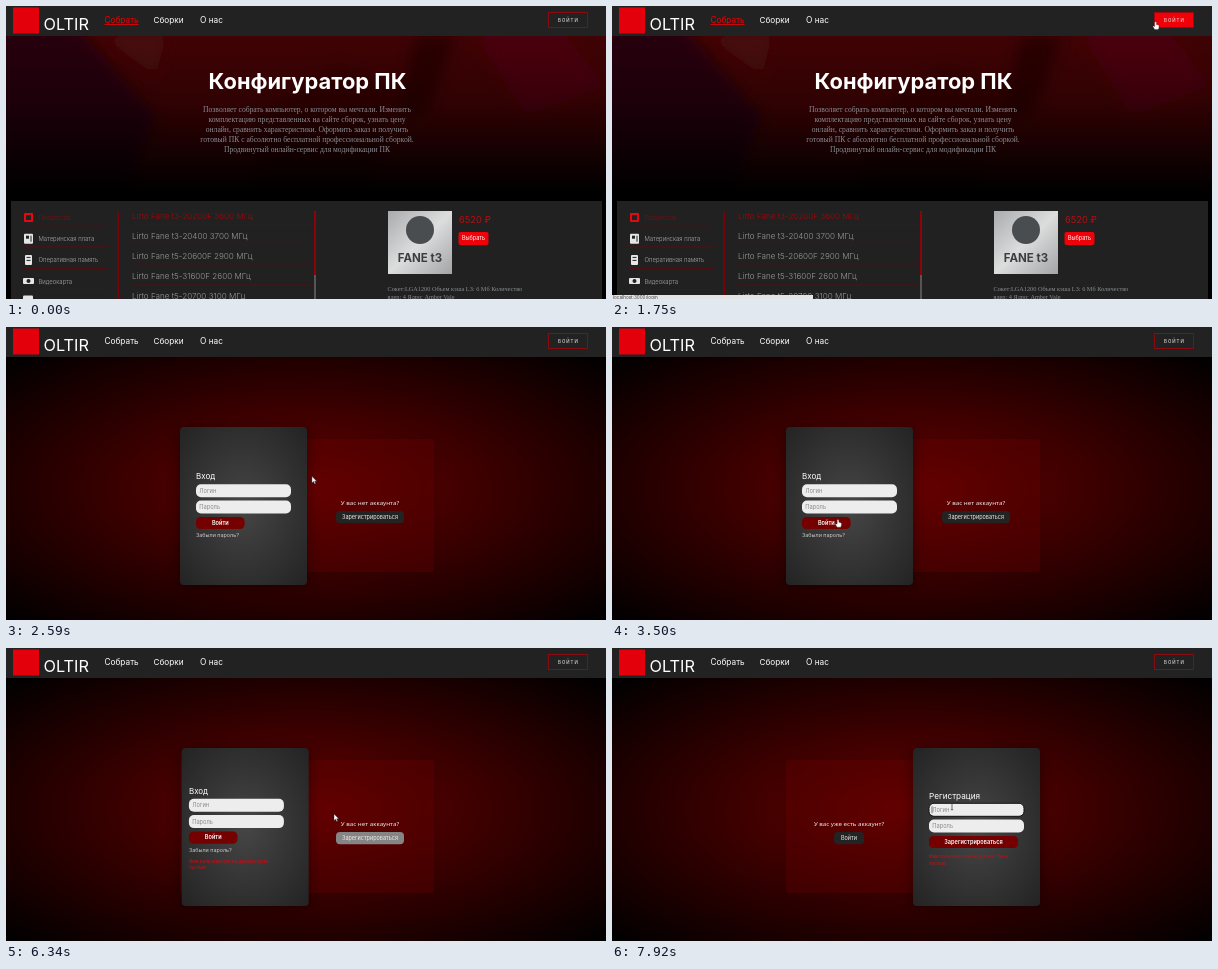
Recreate the animation shown at these times as an HTML page. Size 600 by 293 pixels, loop 8000 ms.

```html
<!DOCTYPE html>
<html lang="ru">
<head>
<meta charset="utf-8">
<title>Конфигуратор ПК</title>
<style>
html, body { margin: 0; width: 100%; height: 100%; overflow: hidden; background: #000; }
svg { display: block; }
text { font-family: Inter, sans-serif; fill: #fff; white-space: pre; }
.serif { font-family: "Liberation Serif", serif; }
.noto { font-family: "Noto Sans", sans-serif; }
.mid { text-anchor: middle; }
.shadow { filter: drop-shadow(0 2px 7px rgba(0, 0, 0, .4)); }
</style>
</head>
<body>
<svg id="stage" width="600" height="293" viewBox="0 0 600 293">
  <defs>
    <linearGradient id="fade" x2="0" y2="1">
      <stop offset="0" stop-color="#000" stop-opacity="0"/>
      <stop offset=".4" stop-color="#000" stop-opacity=".25"/>
      <stop offset=".95" stop-color="#000"/>
    </linearGradient>
    <linearGradient id="chip" x2="1" y2="1">
      <stop stop-color="#a9abad"/><stop offset=".5" stop-color="#dcdddd"/><stop offset="1" stop-color="#a2a4a6"/>
    </linearGradient>
    <radialGradient id="glow" r=".707"><stop stop-color="#680000"/><stop offset="1"/></radialGradient>
    <radialGradient id="steel" r=".707"><stop stop-color="#464646"/><stop offset="1" stop-color="#232323"/></radialGradient>
    <filter id="soft"><feGaussianBlur stdDeviation="7"/></filter>
    <clipPath id="hero"><rect y="30" width="600" height="165"/></clipPath>
    <clipPath id="list"><rect x="120" y="207.5" width="187" height="86"/></clipPath>
  </defs>
  <g id="home"></g>
  <g id="login"></g>
  <g id="header"></g>
  <g id="status">
    <rect y="289" width="201" height="4" fill="#e4e4e4"/>
    <text x="1" y="293.3" font-size="4.6" style="fill:#444">localhost:3000/login</text>
  </g>
  <g id="cursor">
    <path id="arrow" d="M0 0V6.6L1.6 5.2 2.7 7.6 3.8 7.1 2.7 4.8H4.8Z" fill="#fff" stroke="#222" stroke-width=".4"/>
    <path id="hand" transform="scale(.85)" d="M-1 .6Q0-.6 1 .6V3.2L4 4V6.5Q4 8 3 9H-1L-3.2 5.5Q-3 4.3-1 5.5Z" fill="#fff" stroke="#333" stroke-width=".4"/>
    <path id="beam" d="M-1.2-3.2H1.2M0-3.2V3.2M-1.2 3.2H1.2" stroke="#333" stroke-width=".7" fill="none"/>
  </g>
</svg>
<script>
const $ = id => document.getElementById(id);
const rect = (x, y, w, h, fill, r = 0, extra = "") =>
  `<rect x="${x}" y="${y}" width="${w}" height="${h}" rx="${r}" fill="${fill}" ${extra}/>`;
const text = (x, y, size, str, fill = "#fff", { weight = 400, cls = "", extra = "" } = {}) =>
  `<text x="${x}" y="${y}" font-size="${size}" font-weight="${weight}" class="${cls}" style="fill:${fill}" ${extra}>${str}</text>`;
const line = (x1, x2, y) => rect(x1, y, x2 - x1, .8, "#6d0408");
const centred = { cls: "mid" };
const MUTED = "#8a8d93";

// Start page
function heroHtml() {
  const shapes = [
    ["-20,20 70,20 150,110 120,190 -20,190", "#26060a"],
    ["95,30 160,30 150,70", "#4a080a"],
    ["250,110 330,60 400,80 360,190 250,190", "#360204"],
    ["410,30 450,30 420,110 390,110", "#2c0406"],
    ["470,30 560,30 600,80 520,110", "#4c0608"],
  ].map(([points, fill]) => `<polygon points="${points}" fill="${fill}"/>`).join("");
  const about = [
    "Позволяет собрать компьютер, о котором вы мечтали. Изменить",
    "комплектацию представленных на сайте сборок, узнать цену",
    "онлайн, сравнить характеристики. Оформить заказ и получить",
    "готовый ПК с абсолютно бесплатной профессиональной сборкой.",
    "Продвинутый онлайн-сервис для модификации ПК",
  ].map((s, i) => text(301, 105.5 + i * 10.15, 7.62, s, MUTED, { cls: "serif mid" })).join("");
  return `<g clip-path="url(#hero)">${rect(0, 30, 600, 165, "#400204")}<g filter="url(#soft)">${shapes}</g>
    ${rect(0, 30, 600, 165, "url(#fade)")}</g>
    ${text(301.5, 83.3, 21.9, "Конфигуратор ПК", "#fff", { weight: 700, cls: "mid" })}${about}`;
}

function shopHtml() {
  const parts = ["Процессор", "Материнская плата", "Оперативная память", "Видеокарта"];
  const menu = parts.map((name, i) => {
    const y = 211.5 + i * 21.2, color = i ? "#e6e6e6" : "#e00a10";
    const icon = [
      rect(18, y - 4.5, 9, 9, color, 1) + rect(20, y - 2.5, 5, 5, "#222"),
      rect(18, y - 5, 9, 10, color, 1) + rect(20, y - 3, 3, 3, "#222") + rect(24.5, y - 3, 1, 6, "#222"),
      rect(19, y - 5, 7, 10, color, 1) + rect(20.5, y - 3, 4, 1, "#222") + rect(20.5, y, 4, 1, "#222"),
      rect(17, y - 3, 11, 6, color, 1) + `<circle cx="22.5" cy="${y}" r="2" fill="#222"/>`,
    ][i];
    return icon + text(32.5, y + 2.4, 5.95, name, i ? "#aaa" : "#8c080c", { weight: 300 }) + line(17, 102, y + 7.9);
  }).join("") + rect(17, 289.5, 10, 4, "#e6e6e6", 1);
  const items = ["3-20200F 3600", "3-20400 3700", "5-20600F 2900", "5-31600F 2600", "5-20700 3100"];
  const list = items.map((s, i) =>
    text(126, 213.2 + i * 19.9, 8.1, `Lirto Fane t${s} МГц`, i ? "#999" : "#a3070c", { weight: 300 })
    + line(126, 307, 219 + i * 19.9)).join("");
  return rect(5, 195, 591, 98, "#212121") + menu
    + rect(111.5, 205, 1.4, 88, "#7c0408") + `<g clip-path="url(#list)">${list}</g>`
    + rect(308, 205, 2, 88, "#555") + rect(308, 205, 2, 64, "#8c0408")
    + rect(382, 205, 64, 63, "url(#chip)") + `<circle cx="414" cy="224" r="14" fill="#4a4d50"/>`
    + text(414, 255.5, 11.5, "FANE t3", "#3b3d40", { weight: 700, cls: "mid" })
    + text(453, 217, 9.5, "6520 ₽", "#d80a10", { weight: 300 })
    + rect(452.5, 226, 30, 13, "#f00008", 2) + text(467.5, 234.4, 5.5, "Выбрать", "#fff", centred)
    + text(381.5, 284.8, 6.27, "Сокет:LGA1200 Объем кэша L3: 6 Мб Количество", MUTED, { cls: "serif" })
    + text(381.5, 292.5, 6.27, "ядер: 4 Ядро: Amber Vale", MUTED, { cls: "serif" });
}

// Sign-in page; form coordinates are relative to the sliding panel
const field = (y, label, id = "") =>
  rect(16, y, 95, 13, "#ededed", 5, id && `id="${id}"`) + text(19.3, y + 8.5, 5.7, label, "#8a8a8a");
const submit = (y, w, label) =>
  rect(16, y, w, 12.2, "#740000", 4.5) + text(16 + w / 2, y + 8, 5.6, label, "#fff", { weight: 600, cls: "mid" });
const error = y => text(16, y, 4.6, "Имя пользователя не должно быть", "#e8000c")
  + text(16, y + 6.6, 4.6, "пустым", "#e8000c");
const aside = (x, w, question, label, id) =>
  text(x, 178.3, 6.15, question, "#eee", { weight: 500, cls: "noto mid" })
  + rect(x - w / 2, 184, w, 12.3, "#232323", 4, `id="${id}"`) + text(x, 192.2, 5.5, label, "#eee", centred);

function loginHtml() {
  return rect(0, 30, 600, 263, "url(#glow)")
    + rect(174, 112, 254, 133, "rgba(125,0,0,.25)", 3, 'class="shadow"')
    + aside(237, 30, "У вас уже есть аккаунт?", "Войти", "toSignIn")
    + aside(364, 68, "У вас нет аккаунта?", "Зарегистрироваться", "toSignUp")
    + `<g id="panel">${rect(0, 0, 127, 158, "url(#steel)", 4, 'class="shadow"')}
      <svg width="127" height="158">
        <g id="signIn">${text(16, 52.4, 8, "Вход")}${field(57.2, "Логин")}${field(73.5, "Пароль")}
          ${submit(89.9, 48.6, "Войти")}${text(16, 110, 5.4, "Забыли пароль?", "#ccc")}
          <g id="signInError">${error(114.9 + 6.1)}</g></g>
        <g id="signUp">${text(16, 50.8, 8.2, "Регистрация")}${field(55.3, "Логин", "focusField")}${field(71.5, "Пароль")}
          ${submit(87.9, 89, "Зарегистрироваться")}${error(110.4)}
          ${rect(18.7, 58.3, .6, 7, "#222", 0, 'id="caret"')}</g>
      </svg></g>`;
}

function headerHtml() {
  return rect(0, 0, 600, 30, "#222") + rect(7, 1.5, 26, 26, "#e3000b")
    + text(37.5, 24, 16.3, "OLTIR")
    + text(98.5, 16.6, 8.25, "Собрать", "#fff", { extra: 'id="build"' }) + rect(98.5, 18, 34, .8, "#f00008", 0, 'id="underline"')
    + text(147.5, 16.6, 8.2, "Сборки") + text(194, 16.6, 8.3, "О нас")
    + rect(542.5, 6.5, 39, 15, "#f00008", 0, 'id="enterFill"')
    + rect(542.5, 6.5, 39, 15, "none", 0, 'stroke="#a3060c" stroke-width=".8"')
    + text(562.4, 15.8, 4.4, "ВОЙТИ", "#ddd", { weight: 500, cls: "mid", extra: 'letter-spacing="1"' });
}

$("home").innerHTML = heroHtml() + shopHtml();
$("login").innerHTML = loginHtml();
$("header").innerHTML = headerHtml();

// CSS-style cubic-bezier timing
const clamp = v => Math.min(1, Math.max(0, v));
function bezier(x1, y1, x2, y2) {
  const at = (a, b, s) => 3 * a * s * (1 - s) ** 2 + 3 * b * s * s * (1 - s) + s ** 3;
  return x => {
    let lo = 0, hi = 1;
    if (x <= 0 || x >= 1) return clamp(x);
    for (let i = 0; i < 20; i++) {
      const mid = (lo + hi) / 2;
      if (at(x1, x2, mid) < x) lo = mid; else hi = mid;
    }
    return at(y1, y2, lo);
  };
}
const ease = bezier(.25, .1, .25, 1), easeInOut = bezier(.42, 0, .58, 1);

const LOOP = 8000, NAVIGATE = 1800, FAIL = 4000, SWITCH = 6300, FOCUS = 7500, SLIDE = 127;
const path = [
  [90, 583, 300], [750, 558, 36], [1000, 555, 32], [1090, 552, 27], [1250, 548, 21], [1340, 544, 15.5],
  [1740, 544, 15.5], [1840, 526, 27], [2090, 490, 50], [2900, 226, 192.5], [4800, 226, 192.5],
  [5340, 342, 211], [5720, 342, 211], [5840, 345, 189], [6270, 345, 189], [6340, 328, 166],
  [7340, 328, 166], [7480, 340, 158.5],
];
function pointer(t) {
  const i = path.findIndex(p => p[0] > t);
  if (i < 1) return (i ? path.at(-1) : path[0]).slice(1);
  const [t0, x0, y0] = path[i - 1], [t1, x1, y1] = path[i];
  const k = easeInOut((t - t0) / (t1 - t0));
  return [x0 + (x1 - x0) * k, y0 + (y1 - y0) * k];
}

const show = (id, on) => { $(id).style.display = on ? "" : "none"; };
const move = (id, x, y) => $(id).setAttribute("transform", `translate(${x} ${y})`);
const between = (t, a, b) => t >= a && t < b;

function draw(t) {
  show("home", t < NAVIGATE);
  show("login", t >= NAVIGATE);
  show("underline", t < NAVIGATE);
  show("status", between(t, 1450, 2200));
  const white = 255 * ease((t - NAVIGATE) / 400);
  $("build").style.fill = `rgb(${240 + white / 17},${white},${white})`;
  $("enterFill").setAttribute("opacity", ease((t - 1255) / 350) * (1 - ease((t - 1835) / 350)));

  const failed = t >= FAIL;
  show("signInError", failed);
  move("panel", 174 + SLIDE * easeInOut((t - SWITCH) / 500), 100);
  move("signIn", -SLIDE * ease((t - SWITCH) / 500), failed ? -6.4 : 0);
  move("signUp", SLIDE * (1 - ease((t - SWITCH - 250) / 500)), 0);
  $("toSignUp").setAttribute("fill", between(t, 5800, SWITCH + 400) ? "#858585" : "#232323");
  $("focusField").setAttribute("stroke", t >= FOCUS ? "#111" : "none");
  show("caret", t >= FOCUS);

  const hand = between(t, 1250, 1790) || between(t, 2850, 4850) || between(t, 5800, 6290);
  const beam = t >= 6420;
  show("hand", hand);
  show("beam", beam);
  show("arrow", !hand && !beam);
  move("cursor", ...pointer(t));
}

function tick() {
  draw(performance.now() % LOOP);
  requestAnimationFrame(tick);
}
tick();
</script>
</body>
</html>
```
